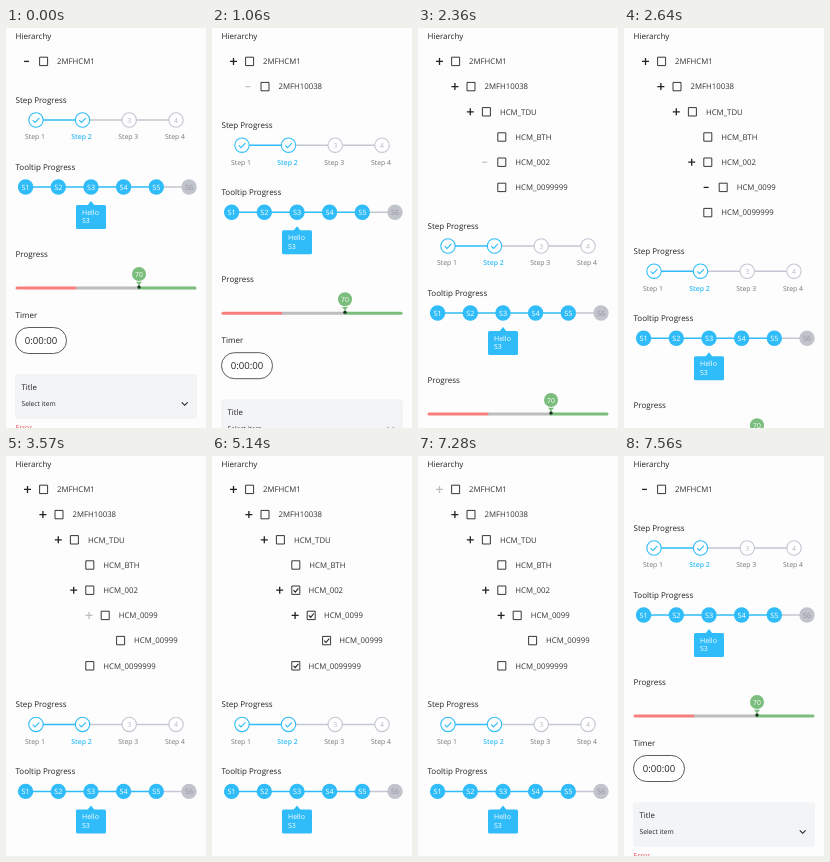
Write an HTML page that moves like this. It is 200x400 px and loops after 8 s.

```html
<!DOCTYPE html>
<html lang="en">
<head>
<meta charset="utf-8">
<title>Form components</title>
<style>
  html, body { margin: 0; width: 100%; height: 100%; overflow: hidden; background: #fdfdfd; }
  svg { display: block; width: 200px; height: 400px; }
  text { font: 8px "Open Sans", "Noto Sans", sans-serif; fill: #222; text-rendering: geometricPrecision; }
  path, line { fill: none; }
  .mid { text-anchor: middle; }
  .row text { font-size: 7.8px; fill: #333; }
  .row path { stroke: #222; }
  .small { font-size: 7px; }
  .step { font-size: 6.9px; fill: #777; }
  .step.now { fill: #2fbcf8; font-weight: 600; }
</style>
</head>
<body>
<svg viewBox="0 0 200 400">
  <text x="9.5" y="11.3">Hierarchy</text>
  <g id="tree"></g>
  <g id="below">
    <text x="9.5" y="75">Step Progress</text>
    <g id="steps"></g>
    <text x="9.5" y="142">Tooltip Progress</text>
    <g id="stops"></g>
    <path d="M81 178l4-5 4 5z" style="fill:#2fbcf8"/>
    <rect x="70" y="177" width="30" height="24" rx="1.5" fill="#2fbcf8"/>
    <text class="small" x="76" y="187" style="fill:#fff">Hello</text>
    <text class="small" x="76" y="195.4" style="fill:#fff">S3</text>

    <text x="9.5" y="229.3">Progress</text>
    <path d="M11 260H70" stroke="#f67f7d" stroke-width="3" stroke-linecap="round"/>
    <path d="M70 260H133" stroke="#bdbdbd" stroke-width="3"/>
    <path d="M133 260H189" stroke="#7bbd7d" stroke-width="3" stroke-linecap="round"/>
    <circle cx="133" cy="246" r="7" fill="#7bbd7d"/>
    <path d="M130 253.8h6l-3 3.6z" style="fill:#7bbd7d"/>
    <circle cx="133" cy="259" r="1.7" fill="#163a1b"/>
    <text class="mid" x="133" y="248.5" style="font-size:6.8px;fill:#fff">70</text>

    <text x="9.5" y="290">Timer</text>
    <rect x="9.5" y="299.5" width="51" height="26" rx="13" fill="#fff" stroke="#333" stroke-width=".8"/>
    <text class="mid" x="35" y="316" style="font-size:9.6px">0:00:00</text>

    <rect x="9" y="346" width="182" height="45" rx="3" fill="#f3f4f6"/>
    <text x="15.5" y="362" style="font-size:7.8px">Title</text>
    <text x="15.5" y="378.2" style="font-size:6.7px">Select item</text>
    <path d="M175.8 374.4l2.9 2.9 2.9-2.9" stroke="#222" stroke-width="1.1"/>
    <text class="small" x="9.5" y="402" style="fill:#e5484d">Error</text>
  </g>
</svg>
<script>
const LOOP = 8000, ROW_H = 25.2, INDENT = 15.4;
const BLUE = '#2fbcf8', GREY = '#c3c7d1';
const $ = id => document.getElementById(id);

function add(parent, tag, attrs, text) {
  const el = document.createElementNS('http://www.w3.org/2000/svg', tag);
  for (const key in attrs) el.setAttribute(key, attrs[key]);
  if (text) el.textContent = text;
  return parent.appendChild(el);
}

function rail(group, xs, y, done) {
  xs.slice(1).forEach((x, i) => add(group, 'line', {
    x1: xs[i], x2: x, y1: y, y2: y, stroke: i < done ? BLUE : GREY, 'stroke-width': 1.5
  }));
}

const stepX = [30, 76.5, 123.2, 170];
rail($('steps'), stepX, 92, 1);
stepX.forEach((x, i) => {
  const g = $('steps'), done = i < 2;
  add(g, 'circle', { cx: x, cy: 92, r: 7.2, fill: '#fff', stroke: done ? BLUE : GREY, 'stroke-width': 1.1 });
  if (done) add(g, 'path', { d: `M${x - 3.3} 92.2l2.3 2.3 4.4-4.6`, stroke: BLUE, 'stroke-width': 1.1 });
  else add(g, 'text', { class: 'mid', x, y: 94.6, style: 'font-size:7px;fill:#b4b9c5' }, i + 1);
  add(g, 'text', { class: 'mid step' + (i === 1 ? ' now' : ''), x: x - 1, y: 111.4 }, 'Step ' + (i + 1));
});

const stopX = [19.6, 52.3, 85, 117.6, 150.3, 183];
rail($('stops'), stopX, 159, 4);
stopX.forEach((x, i) => {
  const on = i < 5;
  add($('stops'), 'circle', { cx: x, cy: 159, r: 7.7, fill: on ? BLUE : '#c1c4cc' });
  add($('stops'), 'text', { class: 'mid', x, y: 161.7, style: `font-size:7.3px;fill:${on ? '#fff' : '#92959d'}` }, 'S' + (i + 1));
});

// name, depth, parent
const rows = [
  ['2MFHCM1', 0, -1], ['2MFH10038', 1, 0], ['HCM_TDU', 2, 1], ['HCM_BTH', 3, 2],
  ['HCM_002', 3, 2], ['HCM_0099', 4, 4], ['HCM_00999', 5, 5], ['HCM_0099999', 3, 2]
].map(([name, depth, parent], i, all) => {
  const g = add($('tree'), 'g', { class: 'row' });
  const leaf = !all.some(r => r[2] === i);
  const mark = add(g, 'path', { 'stroke-width': 1.3 });
  const item = add(g, 'g', {});
  add(item, 'path', { d: 'M33.6-4.2h8v8.4h-8z', 'stroke-width': .9 });
  const tick = add(item, 'path', { d: 'M35.3 0l1.7 1.9 3.2-3.8', 'stroke-width': 1.1 });
  const label = add(item, 'text', { y: 2.8 }, name);
  return { g, depth, parent, leaf, mark, item, tick, label };
});

// start, span, steps, pressed row, pressed part
const taps = [
  [500, 90, 2, 0, 'mark'], [1060, 280, 4, 1, 'mark'], [1620, 270, 4, 2, 'mark'],
  [2360, 280, 4, 4, 'mark'], [3570, 180, 3, 5, 'mark'],
  [4400, 190, 3, 7, 'item'], [4960, 180, 3, 4, 'item'],
  [5700, 280, 4, 0, 'item'], [6440, 280, 4, 0, 'item'], [7280, 280, 4, 0, 'mark']
];
const fade = { 2: [.35, 1], 3: [.28, .65, 1], 4: [.27, .25, .65, 1] };

function check(state, i, value) {
  state.checked[i] = value;
  rows.forEach((r, k) => { if (r.parent === i) check(state, k, value); });
}

function stateAt(t) {
  const s = { open: [], checked: [], press: null };
  for (const [start, span, n, row, part] of taps) {
    if (t < start) break;
    const k = Math.min(n - 1, Math.floor((t - start) / span * (n - 1)));
    if (k < n - 1) s.press = { row, part, alpha: fade[n][k] };
    if (n === 4 && k === 0) continue;
    if (part === 'mark') s.open[row] = !s.open[row];
    else check(s, row, !s.checked[row]);
  }
  return s;
}

function draw(t) {
  const s = stateAt(t), shown = [];
  let count = 0;
  rows.forEach((r, i) => {
    shown[i] = r.parent < 0 || (shown[r.parent] && s.open[r.parent]);
    r.g.style.display = shown[i] ? '' : 'none';
    if (!shown[i]) return;
    r.g.setAttribute('transform', `translate(${r.depth * INDENT} ${33.4 + ROW_H * count++})`);
    r.mark.setAttribute('d', r.leaf ? '' : s.open[i] ? 'M18 0h7M21.5-3.5v7' : 'M18 0h5');
    r.tick.style.display = s.checked[i] ? '' : 'none';
    r.label.setAttribute('x', s.checked[i] ? 50.3 : 51.1);
    for (const part of ['mark', 'item']) {
      const hit = s.press && s.press.row === i && s.press.part === part;
      r[part].setAttribute('opacity', hit ? s.press.alpha : 1);
    }
  });
  $('below').setAttribute('transform', `translate(0 ${ROW_H * (count - 1)})`);
}

function tick(now) {
  draw(now % LOOP);
  requestAnimationFrame(tick);
}
draw(0);
requestAnimationFrame(tick);
</script>
</body>
</html>
```
